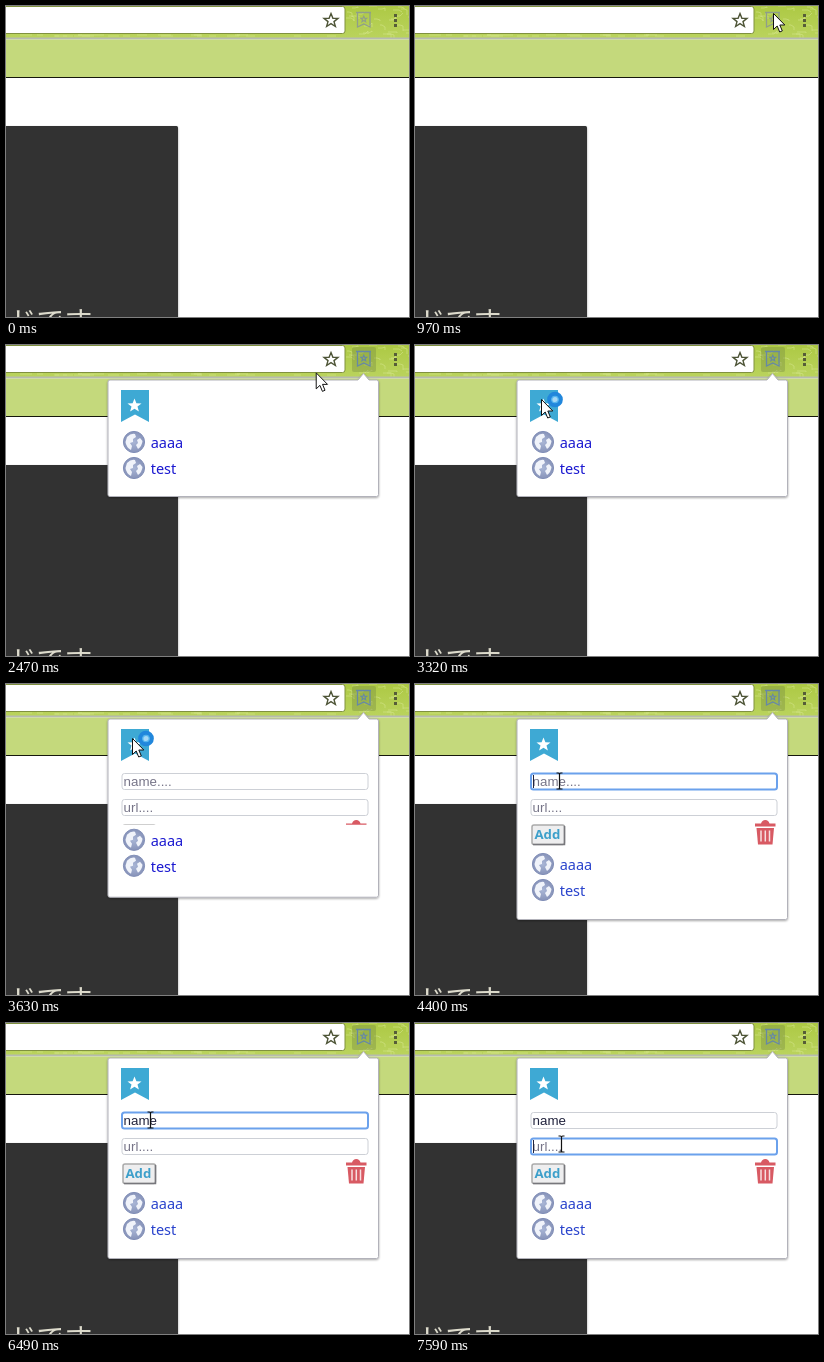
Write an HTML page that moves like this. It is 403 by 311 pixels and loops after 8 s.

```html
<!DOCTYPE html>
<html lang="ja">
<head>
<meta charset="utf-8">
<title>Bookmark popup</title>
<style>
html, body { margin: 0; width: 100%; height: 100%; overflow: hidden; background: #fff; }
svg { display: block; width: 100%; height: 100%; }
.field { fill: #fff; stroke: #cdd0d6; }
.field.focus { stroke: #6ba1ec; stroke-width: 2; }
.input { font: 13.33px "Liberation Sans", Arial, sans-serif; fill: #777588; }
.input.typed { fill: #20223c; }
.link { font: 14.5px "Noto Sans", "Open Sans", sans-serif; }
.add { font: bold 13.2px "Noto Sans", "Open Sans", sans-serif; fill: #3d9fca; }
.slide { font: 300 28px "Noto Sans CJK JP", "Noto Sans CJK", sans-serif; fill: #dedccd; }
</style>
</head>
<body>
<svg viewBox="0 0 403 311">
  <defs>
    <linearGradient id="bar" x2="0" y2="1">
      <stop offset="0" stop-color="#adc944"/><stop offset="1" stop-color="#bad35d"/>
    </linearGradient>
    <radialGradient id="globeFill">
      <stop offset="0" stop-color="#a9b6d6"/><stop offset="1" stop-color="#8793b9"/>
    </radialGradient>
    <filter id="shadow" x="-10%" y="-10%" width="120%" height="125%">
      <feDropShadow dx="0" dy="1" stdDeviation="1.2" flood-opacity=".35"/>
    </filter>
    <clipPath id="formClip"><rect id="formBox" x="103" y="78" width="269" height="0"/></clipPath>
    <path id="star" d="M0-7 1.9-2.3 7-2.1 3 1.1 4.4 6 0 3.2-4.4 6-3 1.1-7-2.1-1.9-2.3Z"/>
    <g id="globe">
      <circle r="10.6" fill="url(#globeFill)" stroke="#8390b8"/>
      <path d="M-7-5Q-3-9 1-8L2-5-1-3-1 0-4 1-2 4-3 8Q-8 5-8.500 0ZM3-2 6-4 8.500-1Q8 4 4 7L2 3 4 1Z" fill="#f0f3fa"/>
    </g>
  </defs>

  <rect width="403" height="32" fill="url(#bar)"/>
  <g id="texture" fill="none" stroke="#d3e58b" stroke-width=".8" opacity=".75"></g>
  <rect x="-5" y=".5" width="344" height="27" rx="2.500" fill="#fff" stroke="#80913f"/>
  <use href="#star" x="325" y="14.500" fill="none" stroke="#4d5436" stroke-width="1.400"/>
  <rect id="hover" x="346" y="2" width="24" height="25" rx="2" fill="#6f8440" opacity=".35"/>
  <g id="icon" fill="none" stroke-width="1.300">
    <path d="M350 6.500H365M351.500 6.500V21L357.800 18 364 21V6.500"/>
    <use href="#star" transform="translate(357.800 13.200) scale(.42)" stroke-width="2.600"/>
  </g>
  <path d="M388 8h3v3h-3zM388 13h3v3h-3zM388 18h3v3h-3z" fill="#565d38"/>
  <path d="M0 32.500H403" stroke="#b7bbb0" stroke-width="2"/>
  <rect y="33.500" width="403" height="37.500" fill="#c4d97c"/>
  <path d="M0 71.500H403" stroke="#15170c"/>
  <rect x="-10" y="120" width="182" height="210" rx="1.500" fill="#303231" filter="url(#shadow)"/>
  <text class="slide" x="2.500" y="326">ドです</text>

  <g id="popup">
    <path id="panel" fill="#fff" stroke="#b2b2ba" filter="url(#shadow)"/>
    <path d="M115 45H143V77L129 69.500 115 77Z" fill="#3ea9d4"/>
    <use href="#star" x="128.500" y="60.500" fill="#fff"/>
    <g clip-path="url(#formClip)">
      <rect id="nameField" class="field" x="116" y="89.500" width="246" height="16" rx="2.500"/>
      <rect id="urlField" class="field" x="116" y="115.500" width="246" height="16" rx="2.500"/>
      <text id="name" class="input" x="117.600" y="102"></text>
      <text class="input" x="117.600" y="128">url....</text>
      <rect id="caret" y="91" width="1" height="13" fill="#20223c"/>
      <rect x="117" y="141" width="32.500" height="19.500" rx="2" fill="#eeeeef" stroke="#aaa" stroke-width="1.500"/>
      <path d="M118 160.500H149.500V142" fill="none" stroke="#77777c" stroke-width="1.500"/>
      <text class="add" x="119.500" y="155.300">Add</text>
      <g fill="#d85a63">
        <path d="M340 139.500H346Q347 136 350.300 136T354.500 139.500H360.500V142.500H340Z"/>
        <path d="M341.500 144H359L357.500 160.500H343Z"/>
        <path d="M346 146.500V157.500M350.300 146.500V157.500M354.500 146.500V157.500" stroke="#f7dfe1" stroke-width="1.500"/>
      </g>
    </g>
    <g id="links">
      <use href="#globe" x="128" y="97"/>
      <use href="#globe" x="128" y="123"/>
      <text class="link" x="144.700" y="102.800">aaaa</text>
      <text class="link" x="144.700" y="128.800">test</text>
    </g>
  </g>

  <g id="arrow">
    <g id="busy">
      <circle cx="14" cy=".5" r="5.600" fill="#a6d8f5" stroke="#2187dc" stroke-width="4.500"/>
      <circle cx="14" cy=".5" r="3.200" fill="none" stroke="#55b5ee" stroke-width="1.200"/>
    </g>
    <path d="M.5.500V16.500L4.200 13 6.700 19 9.300 17.900 6.800 12H11.800Z" fill="#fff" stroke="#111"/>
  </g>
  <path id="beam" d="M-3-8H-1.200Q0-8 0-7 0-8 1.200-8H3M0-7V7M-3 8H-1.200Q0 8 0 7 0 8 1.200 8H3" fill="none" stroke="#111" stroke-width="1.200"/>
</svg>
<script>
const LOOP = 8000;
const $ = id => document.getElementById(id);

// Bursts of screen updates: first time, last time, number of steps.
const bursts = [
  [350, 970, 9], [1290, 1600, 5], [1760, 1930, 3], [2310, 2960, 9],
  [3320, 4010, 10], [4180, 4400, 4], [4940, 4940, 1], [5470, 5470, 1],
  [5660, 5790, 2], [5960, 5960, 1], [6490, 6490, 1], [6810, 6810, 1],
  [6980, 7050, 2], [7230, 7380, 3], [7530, 7590, 2]
];

// Mouse path: time, x, y.
const mouse = [
  [350, 321, 228], [600, 338, 110], [800, 352, 32], [970, 358, 7],
  [2240, 358, 7], [2500, 275, 42], [2700, 180, 75], [2790, 150, 79], [2960, 126, 54],
  [3780, 126, 54], [4010, 140, 106], [4100, 140, 106], [4330, 144, 97],
  [6730, 144, 97], [6810, 135, 95], [6900, 135, 95], [7050, 139, 102],
  [7150, 139, 102], [7380, 146, 121]
];

const clamp = v => Math.max(0, Math.min(1, v));
const swing = v => .5 - Math.cos(Math.PI * clamp(v)) / 2;
const within = (t, a, b) => t >= a && t < b;
const show = (id, on) => $(id).setAttribute("display", on ? "inline" : "none");
const move = (id, x, y) => $(id).setAttribute("transform", `translate(${x} ${y})`);

function snap(t) {
  let held = 0;
  for (const [from, to, n] of bursts) {
    if (t < from) break;
    const gap = n > 1 ? (to - from) / (n - 1) : 1;
    held = Math.min(to, from + Math.floor((t - from) / gap + 1e-6) * gap);
  }
  return held;
}

function mouseAt(t) {
  const i = mouse.findIndex(p => p[0] > t);
  if (i < 0) return mouse[mouse.length - 1].slice(1);
  if (i === 0) return mouse[0].slice(1);
  const [a, b] = [mouse[i - 1], mouse[i]];
  const k = (t - a[0]) / (b[0] - a[0]);
  return [a[1] + (b[1] - a[1]) * k, a[2] + (b[2] - a[2]) * k];
}

function drawPopup(t) {
  const fade = clamp(.58 + (t - 1760) / 170 * .42);
  const drop = 83 * swing((t - 3372) / 400);
  const bottom = 151.5 + Math.min(84, drop * 1.05);
  show("popup", t >= 1760);
  $("popup").setAttribute("opacity", fade);
  move("popup", 0, -1.5 * (1 - fade) / .42);
  $("panel").setAttribute("d",
    `M104 35H352L357.500 28.500 363 35H370.500Q372.500 35 372.500 37V${bottom - 2}q0 2-2 2H104q-2 0-2-2V37Q102 35 104 35Z`);
  $("formBox").setAttribute("height", drop > 0 ? drop + 4 : 0);
  move("links", 0, drop);
  $("links").setAttribute("fill", t < 3780 ? "#1a18d0" : "#2842cc");
}

function drawForm(t) {
  const typed = [5470, 5660, 5790, 5960].filter(k => t >= k).length;
  const onUrl = t >= 7530;
  $("nameField").classList.toggle("focus", t >= 4399 && !onUrl);
  $("urlField").classList.toggle("focus", onUrl);
  $("name").textContent = typed ? "name".slice(0, typed) : "name....";
  $("name").classList.toggle("typed", typed > 0);
  const ends = [118, 125, 132, 143, 150];
  $("caret").setAttribute("x", onUrl ? 118 : ends[typed]);
  $("caret").setAttribute("y", onUrl ? 117 : 91);
  show("caret", within(t, 4399, 4940) || within(t, 5470, 6490) || within(t, 6980, 7530) || t >= 7589);
}

function draw(time) {
  const t = snap(time);
  const [x, y] = mouseAt(t);
  const text = t >= 4180;
  drawPopup(t);
  drawForm(t);
  show("hover", t >= 1290);
  $("icon").setAttribute("stroke", t < 1290 ? "#8f9e8a" : "#6688a6");
  show("arrow", t >= 350 && !text);
  show("beam", text);
  show("busy", within(t, 1360, 2310) || within(t, 3320, 3790));
  move("arrow", x, y);
  move("beam", x + .5, y);
}

// Faint circuit-like traces on the toolbar.
let seed = 7;
const rand = n => (seed = seed * 16807 % 2147483647) % n;
let traces = "";
for (let i = 0; i < 26; i++) {
  traces += `M${340 + rand(63)} ${rand(30)}h${2 + rand(5)}l3 ${rand(7) - 3}v${rand(6)}`;
  traces += `M${rand(335)} ${29 + rand(2)}h${4 + rand(12)}`;
}
$("texture").innerHTML = `<path d="${traces}"/>`;

const start = performance.now();
function tick() {
  draw((performance.now() - start) % LOOP);
  requestAnimationFrame(tick);
}
tick();
</script>
</body>
</html>
```
